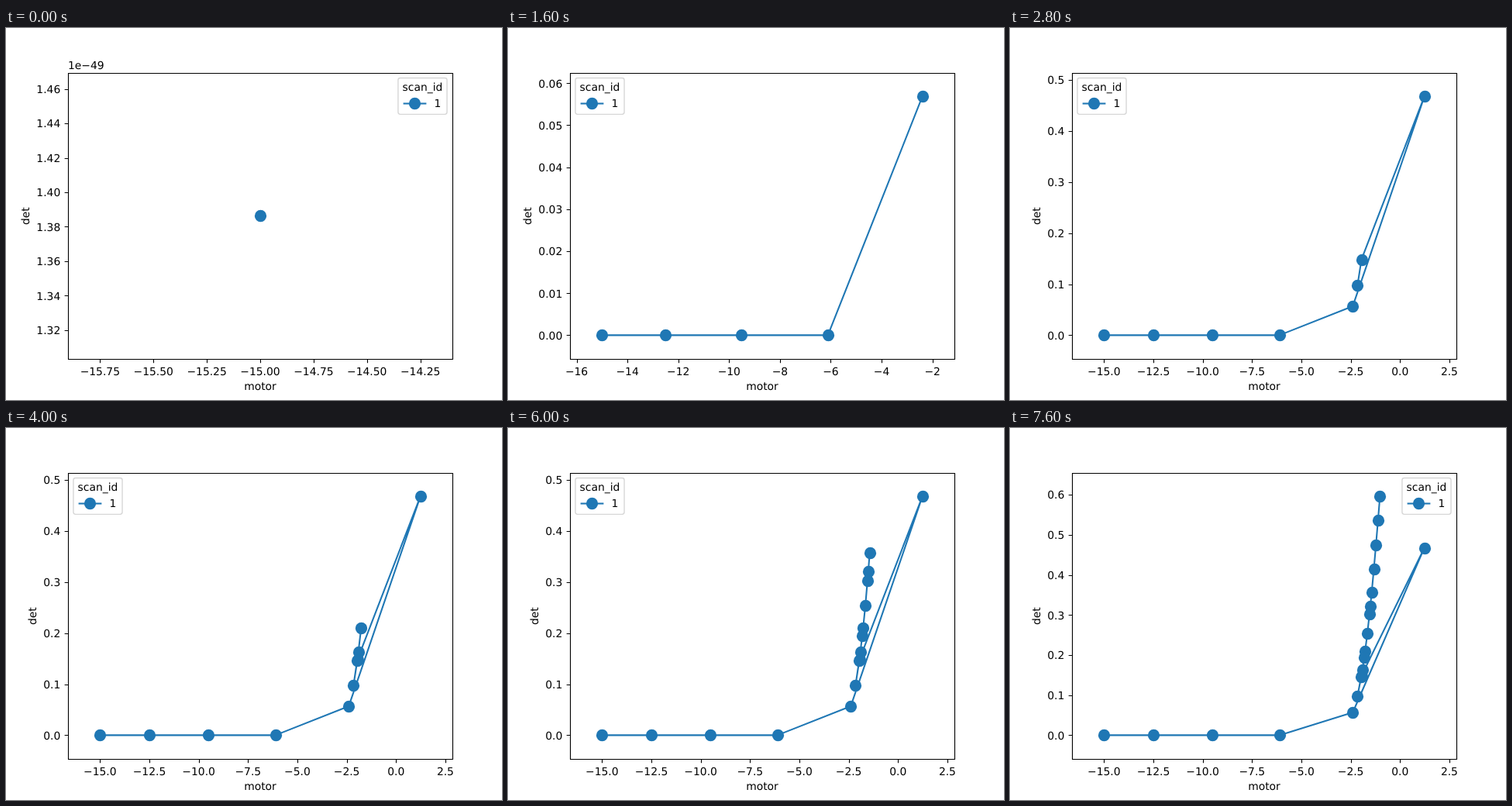
Write an HTML page that moves like this. It is 640 by 480 pixels and loops after 8 s.

```html
<!DOCTYPE html>
<html lang="en">
<head>
<meta charset="utf-8">
<title>Adaptive scan</title>
<style>
  html, body { margin: 0; width: 100%; height: 100%; overflow: hidden; background: #fff; }
  svg { display: block; width: 640px; height: 480px; }
  text { font: 13.889px "DejaVu Sans", sans-serif; fill: #000; text-rendering: geometricPrecision; white-space: pre; }
</style>
</head>
<body>
<svg id="plot" viewBox="0 0 640 480"></svg>
<script>
const STEP_MS = 400, STEPS = 20;
const BLUE = '#1f77b4';
const BOX = { left: 80, right: 576, top: 57.6, bottom: 427.2 };
const svg = document.getElementById('plot');

const snap = v => Math.floor(v + 0.5) + 0.5;
const gauss = x => Math.exp(-x * x / 2);

// Adaptive scan: the step follows the slope and steps back when it overshoots.
function scan(count) {
  const minStep = 0.01, maxStep = 5, delta = 0.05;
  const points = [];
  let x = -15, step = (maxStep - minStep) / 2, past = null;
  while (points.length < count) {
    const y = gauss(x);
    points.push([x, y]);
    if (past === null) {
      past = y;
    } else {
      const slope = Math.abs(y - past) / step;
      const next = Math.min(maxStep, Math.max(minStep, delta / slope));
      if (next < step * 0.8) {
        x -= step;
        step = next;
      } else {
        past = y;
        step = 0.2 * next + 0.8 * step;
      }
    }
    x += step;
  }
  return points;
}

const points = scan(STEPS);

function limits(values) {
  let lo = Math.min(...values), hi = Math.max(...values);
  if (lo === hi) {
    const pad = Math.abs(lo) * 0.05;
    lo -= pad;
    hi += pad;
  }
  const margin = (hi - lo) * 0.1;
  return [lo - margin, hi + margin];
}

function ticks([lo, hi]) {
  const raw = (hi - lo) / 9;
  const unit = 10 ** Math.floor(Math.log10(raw));
  const step = unit * [1, 2, 2.5, 5, 10].find(s => s * unit > raw * (1 + 1e-6));
  const first = Math.ceil(lo / step), last = Math.floor(hi / step);
  const biggest = Math.max(Math.abs(first - 1), Math.abs(last + 1)) * step;
  let order = Math.floor(Math.log10(biggest) + 1e-9);
  if (order > -5) order = 0;
  const size = step / 10 ** order;
  const digits = [0, 1, 2].find(d => {
    const n = size * 10 ** d;
    return Math.abs(n - Math.round(n)) < 1e-6;
  });
  const list = [];
  for (let k = first; k <= last; k++) {
    list.push({ value: k * step, label: (k * size).toFixed(digits).replace('-', '\u2212') });
  }
  return { list, order };
}

const text = (x, y, str, anchor = 'middle', extra = '') =>
  `<text x="${x}" y="${y}" text-anchor="${anchor}" ${extra}>${str}</text>`;

const line = d =>
  `<path d="${d}" fill="none" stroke="${BLUE}" stroke-width="2.083" stroke-linecap="square" stroke-linejoin="round"/>`;

const dot = (x, y) => `<circle cx="${snap(x)}" cy="${snap(y)}" r="7.64" fill="${BLUE}"/>`;

function legend(x) {
  return `<rect x="${x}" y="64.54" width="63.1" height="46.8" rx="2.78" fill="#fff" stroke="#ccc" stroke-opacity="0.8" stroke-width="1.389"/>`
    + text(x + 31.5, 81, 'scan_id')
    + line(`M${x + 7.7} 97.5H${x + 35.4}`)
    + dot(x + 21.5, 97)
    + text(x + 46.6, 102, '1', 'start');
}

function draw(step) {
  const shown = points.slice(0, step + 1);
  const xLim = limits(shown.map(p => p[0])), yLim = limits(shown.map(p => p[1]));
  const px = v => BOX.left + (v - xLim[0]) / (xLim[1] - xLim[0]) * (BOX.right - BOX.left);
  const py = v => BOX.bottom - (v - yLim[0]) / (yLim[1] - yLim[0]) * (BOX.bottom - BOX.top);
  const xs = ticks(xLim), ys = ticks(yLim);
  const spots = shown.map(([x, y]) => [px(x), py(y)]);

  let marks = '', labels = '';
  for (const t of xs.list) {
    const x = px(t.value);
    marks += `M${snap(x)} 427.5v4.86`;
    labels += text(x.toFixed(2), 448, t.label);
  }
  for (const t of ys.list) {
    const y = py(t.value);
    marks += `M80.5 ${snap(y)}h-4.86`;
    labels += text(70.28, Math.round(y + 5.3), t.label, 'end');
  }
  if (ys.order) labels += text(80, 53, '1e\u2212' + -ys.order, 'start');

  const nameX = ys.list[0].label.length > 3 ? 30 : 39;
  labels += text(328, 467, 'motor')
    + text(0, 0, 'det', 'middle', `transform="translate(${nameX} 242.6) rotate(-90)"`);

  const onLeft = step > 0 && step < 18;
  svg.innerHTML = '<rect width="640" height="480" fill="#fff"/>'
    + `<path d="${marks}" stroke="#000" stroke-width="1.11"/>`
    + (shown.length > 1 ? line('M' + spots.map(p => p.join(' ')).join('L')) : '')
    + spots.map(p => dot(...p)).join('')
    + '<path d="M80.5 58.5H576.5V427.5H80.5Z" fill="none" stroke="#000" stroke-width="1.11"/>'
    + labels
    + legend(onLeft ? 86.94 : 505.95);
}

const start = performance.now();
let current = -1;

function tick() {
  const step = Math.floor((performance.now() - start) / STEP_MS) % STEPS;
  if (step !== current) draw(current = step);
  requestAnimationFrame(tick);
}
tick();
</script>
</body>
</html>
```
